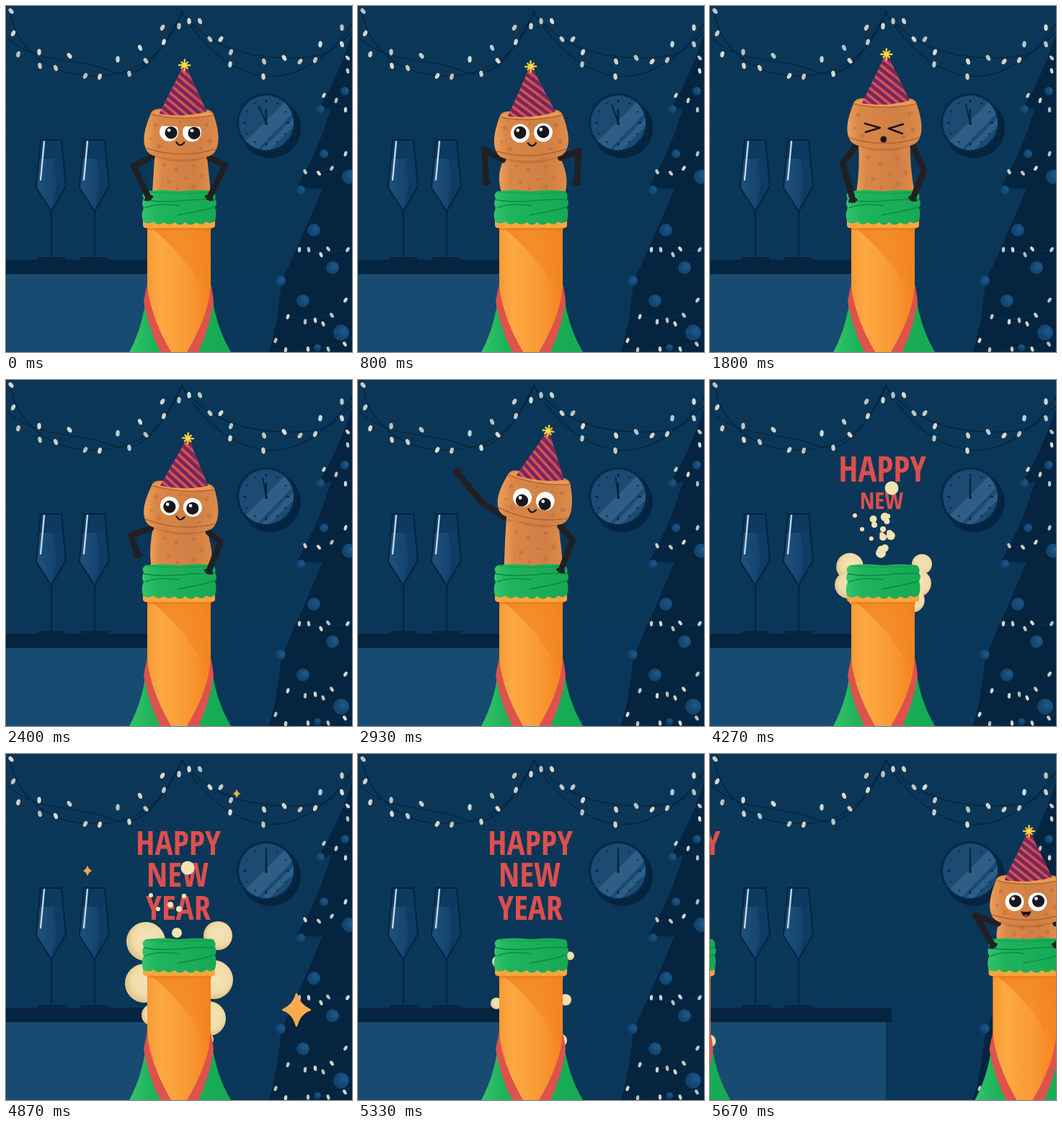
Recreate the animation shown at these times as an HTML page. Size 480 by 480 pixels, loop 5740 ms.

```html
<!DOCTYPE html>
<html lang="en">
<head>
<meta charset="utf-8">
<title>Happy New Year</title>
<style>
html, body { margin: 0; width: 100%; height: 100%; overflow: hidden; background: #0b3658; }
svg { display: block; width: 100vw; height: 100vh; }
.msg { font-weight: 700; font-stretch: 62.5%; fill: #dc4f4d; text-anchor: middle; }
.line { fill: none; stroke-linecap: round; stroke-linejoin: round; }
</style>
</head>
<body>
<svg id="stage" viewBox="0 0 480 480">
  <defs>
    <linearGradient id="wall" x2="0" y2="1"><stop stop-color="#0b3658"/><stop offset="1" stop-color="#0a3759"/></linearGradient>
    <linearGradient id="glass"><stop stop-color="#1c527f"/><stop offset=".5" stop-color="#164672"/><stop offset="1" stop-color="#0e3b63"/></linearGradient>
    <linearGradient id="cork"><stop stop-color="#eda057"/><stop offset=".16" stop-color="#d98748"/><stop offset=".7" stop-color="#d07f45"/><stop offset="1" stop-color="#dd8c49"/></linearGradient>
    <linearGradient id="foil"><stop stop-color="#f99a35"/><stop offset=".2" stop-color="#fda941"/><stop offset=".6" stop-color="#f99b37"/><stop offset="1" stop-color="#f5851f"/></linearGradient>
    <linearGradient id="green"><stop stop-color="#35c56b"/><stop offset=".2" stop-color="#1fb45c"/><stop offset="1" stop-color="#16a953"/></linearGradient>
    <linearGradient id="fade" x1="0" y1="0" x2="1" y2="1"><stop stop-color="#ee7e1d" stop-opacity=".75"/><stop offset="1" stop-color="#ee7e1d" stop-opacity=".15"/></linearGradient>
    <radialGradient id="foam" cx=".55" cy=".45"><stop stop-color="#f4e3b6"/><stop offset=".75" stop-color="#f0dcaa"/><stop offset="1" stop-color="#e3c98f"/></radialGradient>
    <radialGradient id="ball" cx=".65" cy=".4"><stop stop-color="#1d5a8b"/><stop offset="1" stop-color="#124470"/></radialGradient>
    <clipPath id="faceClip"><circle cx="361" cy="162" r="38"/></clipPath>
    <clipPath id="hatClip"><path d="M-33 2L-2-62Q1-67 4-62L33-2Q2 7-33 2Z"/></clipPath>

    <g id="hat">
      <g clip-path="url(#hatClip)">
        <rect x="-40" y="-70" width="80" height="80" fill="#db524f"/>
        <path id="stripes" class="line" stroke="#74285f" stroke-width="5"/>
        <path d="M33-2L4-62 0-66 20 6Z" fill="#74285f" opacity=".16"/>
      </g>
      <path id="star" class="line" stroke="#ffce35" stroke-width="2.4"/>
      <circle cx="1" cy="-66" r="3.2" fill="#ffd84a"/>
    </g>

    <g id="head">
      <path d="M-43-27Q-41-35-30-35Q0-31 32-35Q43-35 45-27Q56 5 49 20Q46 29 34 31Q0 38-34 31Q-46 29-49 20Q-56 5-43-27Z" fill="url(#cork)"/>
      <path d="M-41-27Q-39-33-30-33Q0-30 32-33Q41-33 43-27Q0-18-41-27Z" fill="#e89a55"/>
      <g class="line" stroke="#a95a2b" stroke-width="1.6" opacity=".75"><path d="M-41-27Q0-18 43-27"/><path d="M-48 20Q0 35 48 20"/></g>
      <g fill="#b5683a" opacity=".45"><circle cx="-36" cy="-12" r="3"/><circle cx="-41" cy="7" r="2"/><circle cx="-30" cy="17" r="3.2"/><circle cx="35" cy="-14" r="3"/><circle cx="40" cy="9" r="3.4"/><circle cx="27" cy="19" r="2.4"/><circle cx="-1" cy="-17" r="2"/></g>
    </g>

    <g id="bottle">
      <path d="M196 385Q193 440 171 480H312Q288 440 284 385Z" fill="url(#green)"/>
      <path d="M196 300H284V386Q287 398 288 410Q283 446 267 480H214Q197 446 191 410Q193 398 196 386Z" fill="#dd524d"/>
      <path d="M196 300H284V386Q282 428 251 480H229Q199 428 196 386Z" fill="url(#foil)"/>
      <path d="M202 308H284V386Q282 400 276 414Q270 365 202 308Z" fill="url(#fade)"/>
      <path d="M190 296H290V304Q290 308 285 308H195Q190 308 190 304Z" fill="#fba53e"/>
      <path d="M195 308H285V311H197Z" fill="#e77817" opacity=".55"/>
      <path d="M194 257Q215 254 240 257Q266 254 287 257Q292 261 290 268Q294 273 290 279Q293 288 290 298Q284 304 278 299Q271 306 264 300Q256 307 249 300Q241 307 234 300Q226 306 219 300Q211 306 205 299Q197 304 190 299Q187 288 191 280Q187 274 191 267Q187 261 194 257Z" fill="url(#green)"/>
      <g class="line" stroke="#0b8b47" stroke-width="1.6"><path d="M192 269Q215 273 246 270T289 269"/><path d="M193 280Q210 273 240 277"/><path d="M238 290Q268 285 289 279"/></g>
      <path d="M196 258Q240 262 286 258" class="line" stroke="#0b8b47" stroke-width="1" opacity=".6"/>
    </g>
  </defs>
  <g id="room"></g>
  <g id="bulbs"></g>
  <g id="hands"></g>
  <g id="sparks"></g>
  <g id="front"></g>
</svg>
<script>
const $ = id => document.getElementById(id);
const STEP = 1000 / 15, COUNT = 86, LOOP = 5740;
const POP = 61, LEAVE = 81;
const INK = '#04243f', BLACK = '#202024';
const clamp = v => Math.max(0, Math.min(1, v));
const circle = (x, y, r, fill) => `<circle cx="${x}" cy="${y}" r="${r}" fill="${fill}"/>`;
const line = (d, color, w) => `<path class="line" d="${d}" stroke="${color}" stroke-width="${w}"/>`;
const group = (transform, inner) => `<g transform="${transform}">${inner}</g>`;
const range = n => [...Array(n).keys()];

// ---------- room ----------
const wineGlass = x => group(`translate(${x} 0)`,
  `<path d="M48 186H77L83 250 63 285 42 252Z" fill="#0d3a61"/>
   <path d="M47 212H79L83 250 63 285 42 252Z" fill="url(#glass)"/>
   <path d="M66 212H79L83 250 63 285 70 250Z" fill="#0d3c65"/>` +
  line('M48 186H77L83 250 63 285 42 252ZM63 285V349', INK, 2) +
  line('M45 350H81', INK, 3) + line('M53 188L48 241', '#c8d5df', 2.4));

const balls = [[470,118,6],[436,143,6],[441,205,6],[476,237,10],[409,255,6],[427,311,9],
  [453,363,9],[381,381,7],[412,409,9],[465,453,11],[432,474,5]];

const clock = () => {
  const ticks = range(12).map(i =>
    `<path d="M361 130V${i % 3 ? 132 : 134}" transform="rotate(${i * 30} 361 162)" stroke="${INK}" stroke-width="2"/>`).join('');
  return circle(367, 169, 42, INK) + circle(361, 162, 41, '#05294a') + circle(361, 162, 38, '#1b4a72') +
    `<g clip-path="url(#faceClip)"><path d="M325 195L392 128 404 142 345 203Z" fill="#2e5d85"/>
     <path d="M349 205L407 147 412 153 356 210Z" fill="#2e5d85"/></g>` + ticks;
};

$('room').innerHTML = `<rect width="480" height="480" fill="url(#wall)"/>
  <rect y="370" width="244" height="110" fill="#184b72"/><rect y="352" width="252" height="20" fill="${INK}"/>` +
  wineGlass(0) + wineGlass(60) +
  `<path d="M480 40Q462 95 432 146Q443 145 451 140Q434 200 404 250Q424 254 439 253Q412 318 382 384Q377 440 365 480H480Z" fill="${INK}"/>` +
  balls.map(([x, y, r]) => circle(x, y, r, 'url(#ball)')).join('') +
  line('M438 122Q457 138 480 140M412 230Q452 236 480 198M400 336Q440 350 480 334M386 428Q440 450 480 402M370 476Q430 484 480 462', '#0b3355', 1) +
  clock() +
  line('M5 0C10 55 55 98 125 97S225 55 244 9', INK, 1.2) +
  line('M0 42C40 82 95 70 145 90S222 48 244 9', INK, 1.2) +
  line('M244 9C275 60 315 92 358 97S450 72 480 24', INK, 1.2) +
  line('M244 9C270 42 310 70 385 72S455 55 480 36', INK, 1.2) + circle(244, 9, 2, INK);

const cord = [[7,7],[10,38],[17,67],[46,64],[47,83],[69,86],[88,69],[110,97],[130,98],[155,74],
  [171,94],[186,58],[194,76],[217,30],[219,50],[240,28],[254,21],[269,21],[283,46],[298,46],[312,64],
  [311,81],[357,98],[358,77],[386,72],[408,77],[429,75],[436,53],[466,30],[466,53]];
const treeLights = [[474,72],[441,124],[458,131],[471,144],[474,90],[415,230],[434,232],[452,225],
  [471,205],[407,338],[420,338],[437,345],[447,337],[474,338],[391,431],[415,438],[429,436],
  [440,441],[452,429],[471,408],[374,464],[388,477],[419,476],[447,476],[470,469]];

const bulb = (n, rx, ry) => ([x, y], i) => {
  const glow = .92 + .08 * Math.sin(2 * Math.PI * n * 5 / COUNT + i * 2.4);
  return `<ellipse cx="${x}" cy="${y}" rx="${rx}" ry="${ry}" fill="#dcdcd2" opacity="${glow}" transform="rotate(${(i * 67) % 80 - 40} ${x} ${y})"/>`;
};

// ---------- hat details ----------
$('stripes').setAttribute('d', range(10).map(i => `M-60 ${i * 11 - 110}L60 ${i * 11 - 14}`).join(''));
$('star').setAttribute('d', range(8).map(i => {
  const a = i * Math.PI / 4, r = i % 2 ? 6 : 7.5;
  return `M1-66l${(r * Math.cos(a)).toFixed(2)} ${(r * Math.sin(a)).toFixed(2)}`;
}).join(''));

// ---------- motion tracks, first value is the step ----------
// x, y, tilt, bulge
const body = [[0,243,178,1,0],[4,243,175,1,-2],[8,242,179,0,3],[12,240,180,-2,12],[16,240,182,-2,13],
  [20,242,176,0,4],[24,241,165,0,-3],[27,241,163,0,-4],[31,241,161,0,-4],[34,242,180,2,8],
  [39,245,170,7,2],[44,246,165,9,1],[50,247,167,9,3],[53,246,160,8,4],[56,246,152,6,8],
  [58,246,150,5,8],[60,245,166,0,14],[61,243,110,0,0],[62,243,-10,0,0],[63,243,-200,0,0],[81,243,203,0,5]];
// face x, y, gaze x, y, lid, shut, mouth
const face = [[0,-1,-3,3,1,-8,0,0],[8,-1,-3,3,1,-8,0,0],[11,1,-4,0,-1,-13,0,0],[19,1,-2,0,0,-13,0,0],
  [21,-1,4,0,0,-13,1,1],[27,-1,6,0,0,-13,1,1],[32,-1,2,0,0,-13,0,0],[34,0,-1,0,1,-13,0,0],
  [44,-2,1,0,4,-13,0,0],[53,-1,0,0,2,-13,0,0],[54,0,0,1,-2,-13,0,1],[60,0,0,1,-2,-13,0,1],[81,-1,2,1,-1,-12.5,0,2]];
// elbow x, y, hand x, y
const leftArm = [[0,177,222,196,262],[9,177,220,196,262],[12,175,199,178,241],[16,175,203,178,243],
  [20,180,218,197,264],[27,184,218,197,265],[34,178,222,197,264],[37,172,213,176,230],[40,168,180,150,150],
  [44,170,168,140,131],[47,170,161,163,124],[50,170,167,140,131],[53,170,162,160,124],[56,170,160,165,127],
  [60,172,180,160,140],[61,180,160,170,200],[62,185,40,175,80],[81,172,224,194,262]];
const rightArm = [[0,304,221,284,262],[9,304,220,284,262],[12,306,201,304,241],[16,306,204,304,243],
  [20,302,222,283,263],[27,297,228,283,263],[44,298,222,283,260],[56,294,232,283,260],
  [60,300,225,284,260],[61,306,160,312,200],[62,303,40,308,80],[81,309,224,286,262]];

function at(track, n) {
  let i = track.length - 1;
  while (track[i][0] > n) i--;
  const a = track[i], b = track[i + 1] || a;
  const u = b === a ? 0 : (n - a[0]) / (b[0] - a[0]), e = u * u * (3 - 2 * u);
  return a.slice(1).map((v, k) => v + (b[k + 1] - v) * e);
}

// ---------- character ----------
function pose(n) {
  let [x, y, r, bulge] = at(body, n);
  if (n > 21 && n < 32) x += n % 2 ? .8 : -.8;
  const c = Math.cos(r * Math.PI / 180), s = Math.sin(r * Math.PI / 180);
  return { x, y, r, bulge, to: (px, py) => [x + px * c - py * s, y + px * s + py * c] };
}

function neck({ y, bulge, to }) {
  const foot = Math.min(259, y + 110), out = Math.max(0, bulge) * .3;
  const [lx, ly] = to(-36, 26), [rx, ry] = to(36, 26);
  const bl = 203 - out, br = 284 + out;
  const shape = `M${lx} ${ly}Q${(lx + bl) / 2 - bulge} ${(ly + foot) / 2} ${bl} ${foot}Q244 ${foot + 5} ${br} ${foot}` +
    `Q${(rx + br) / 2 + bulge} ${(ry + foot) / 2} ${rx} ${ry}Z`;
  const mid = (ly + ry) / 2, h = foot - mid;
  const spots = [[-24,.3,2.4],[-8,.42,3.2],[16,.32,2.6],[27,.6,3.4],[6,.64,2.2],[-18,.72,3],[17,.84,3],[-6,.9,2.4]];
  return `<path d="${shape}" fill="url(#cork)"/><g opacity=".45">` +
    spots.map(([dx, v, r]) => circle(244 + dx, mid + h * v, r, '#b5683a')).join('') + '</g>' +
    `<path d="M${lx} ${ly + 6}Q${(lx + rx) / 2} ${mid + 19} ${rx} ${ry + 6}V${ry}H${lx}Z" fill="#9d5227" opacity=".3"/>`;
}

function arm([sx, sy], [ex, ey, hx, hy]) {
  const a = Math.atan2(hy - ey, hx - ex);
  const fingers = [-.75, -.25, .25, .75].map(d =>
    `M${hx} ${hy}l${7 * Math.cos(a + d)} ${7 * Math.sin(a + d)}`).join('');
  return line(`M${sx} ${sy}L${ex} ${ey}L${hx} ${hy}`, BLACK, 8.5) + line(fingers, BLACK, 3.6);
}

function eye(x, gx, gy, lid) {
  const w = Math.sqrt(Math.max(0, 169 - lid * lid)) || .01;
  return group(`translate(${x} 0)`, `<path d="M${-w} ${lid}A13 13 0 1 0 ${w} ${lid}Z" fill="#fff"/>` +
    circle(gx, gy, 8.6, '#17171b') + circle(gx - 3, gy - 3.4, 2.4, '#fff'));
}

const mouths = [
  line('M-5.5-2Q0 6 5.5-2', '#1b1518', 2.2),
  '<ellipse rx="4.4" ry="4.6" fill="#1b1518"/>',
  '<path d="M-7-3Q0-1 7-3Q5 5 0 5Q-5 5-7-3Z" fill="#1b1518"/><path d="M-3 3Q0 1 3 3Q0 5-3 3Z" fill="#db524f"/>'
];

function head(p, n) {
  const [fx, fy, gx, gy, lid] = at(face, n);
  const [shut, mouth] = face.filter(k => k[0] <= n).pop().slice(6);
  const eyes = shut
    ? line('M-26-6L-5 0-25 6M27-5L7 1 26 8', '#1b1518', 2.6)
    : eye(-16, gx, gy, lid) + eye(16, gx, gy, lid);
  const hatTilt = n > 53 && n < 60 ? 4 : 0;
  return group(`translate(${p.x} ${p.y}) rotate(${p.r})`,
    `<use href="#head"/>` + group(`translate(2 -30) rotate(${hatTilt})`, '<use href="#hat"/>') +
    group(`translate(${fx} ${fy})`, eyes + group('translate(0 16)', mouths[mouth])));
}

// ---------- celebration ----------
const blobs = [[194,260,27],[192,318,27],[203,362,15],[294,252,20],[288,313,27],[281,367,24],[279,396,9]];
function foam(n) {
  if (n < POP) return '';
  const u = clamp((n - POP) / 12), k = 1 - (1 - u) ** 2, after = Math.max(0, n - 73);
  return blobs.map(([x, y, r], i) => {
    const last = i === blobs.length - 1;
    const size = r * Math.min(1, k * 1.6) * (last ? 1 : clamp(1 - after / 10));
    const cx = x + (last ? after * .3 : 0);
    return circle(cx, 258 + (y - 258) * k + after * (last ? .2 : 4), size, 'url(#foam)');
  }).join('');
}

const drops = [[252,158,9.5],[237,248,7],[228,209,4],[240,215,4],[211,215,3],[201,196,3],[247,197,3.2]];
function bubbles(n) {
  if (n < POP || n > 82) return '';
  const d = n - 73, out = [];
  if (n > 63) for (const [x, y, r] of drops) out.push([x, y + 9 * d + .9 * d * d, r]);
  if (n < 72) for (const i of range(12)) {
    const k = n - POP - i % 3;
    if (k >= 0) out.push([240 + k * ((i * 37) % 13 - 6) * .9, 250 - k * (16 + (i * 29) % 11) + 2 * k * k, 3 + i % 4]);
  }
  return out.filter(o => o[1] < 256).map(([x, y, r]) => circle(x, y, r, '#f3e2b3')).join('');
}

const words = [['HAPPY', 239, 140], ['NEW', 238, 184], ['YEAR', 239, 230]];
function message(n) {
  return words.map(([word, x, y], i) => {
    const u = clamp((n - POP - 1 - i) / 5), v = u - 1;
    const s = 1 + 2.7 * v ** 3 + 1.7 * v * v;
    return u ? group(`translate(${x} ${y - 18}) scale(${s})`, `<text class="msg" y="18">${word}</text>`) : '';
  }).join('');
}

const twinkles = [[403,355,22,66,80],[113,162,6.5,68,78],[320,55,5.5,68,78]];
const sparks = n => twinkles.map(([x, y, size, from, to]) => {
  const s = size * Math.sin(Math.PI * clamp((n - from) / (to - from)));
  return s > .1 ? group(`translate(${x} ${y}) scale(${s})`,
    '<path d="M0-1Q.16-.32.85 0Q.2.22 0 1Q-.2.22-.85 0Q-.16-.32 0-1Z" fill="#fbab4e" stroke="#fbab4e" stroke-width=".12" stroke-linejoin="round"/>') : '';
}).join('');

function bottle(n, dx, hasCork) {
  const p = pose(n);
  const parts = hasCork
    ? neck(p) + '<use href="#bottle"/>' + arm(p.to(-40, 32), at(leftArm, n)) + arm(p.to(40, 32), at(rightArm, n)) + head(p, n)
    : '<use href="#bottle"/>';
  const party = hasCork && n < POP || n >= LEAVE && hasCork ? ['', ''] : [foam(n), message(n) + bubbles(n)];
  return group(`translate(${dx} 0)`, party[0] + parts + party[1]);
}

// ---------- lettering: narrowest installed face ----------
function pickFont() {
  const t = document.createElementNS('http://www.w3.org/2000/svg', 'text');
  t.setAttribute('class', 'msg');
  t.textContent = words[0][0];
  $('stage').append(t);
  let best = { w: Infinity };
  for (const name of ['Noto Sans', 'Open Sans Condensed', 'Open Sans', 'Roboto Condensed', 'Roboto', 'Lato']) {
    t.style.font = `700 51px "${name}", sans-serif`;
    t.style.fontStretch = '62.5%';
    const w = t.getComputedTextLength();
    if (w < best.w) best = { w, name };
  }
  t.remove();
  const css = document.createElement('style');
  css.textContent = `.msg { font-family: "${best.name}", sans-serif; font-size: ${51 * Math.min(1, 118 / best.w)}px; }`;
  document.head.append(css);
}

function draw(n) {
  $('bulbs').innerHTML = cord.map(bulb(n, 2.7, 4.4)).join('') + treeLights.map(bulb(n, 2.2, 3.8)).join('');
  $('hands').innerHTML =
    `<path d="M361 163V143" stroke="${INK}" stroke-width="2.4" transform="rotate(${-2 * clamp(1 - n / 63)} 361 162)"/>` +
    `<path d="M361 164V135" stroke="${INK}" stroke-width="1.8" transform="rotate(${-24 * clamp(1 - n / 63)} 361 162)"/>` + circle(361, 163, 2, INK);
  $('sparks').innerHTML = sparks(n);
  const slide = 480 * clamp((n - LEAVE) / 5) ** 2.36;
  $('front').innerHTML = bottle(n, -slide, n < 63) + (n > LEAVE ? bottle(n, 480 - slide, true) : '');
}

pickFont();
const start = performance.now();
let shown = -1;
function tick() {
  const t = (performance.now() - start) % LOOP;
  const n = Math.min(COUNT - 1, Math.floor((t + 3.4) / STEP));
  if (n !== shown) draw(shown = n);
  requestAnimationFrame(tick);
}
tick();
</script>
</body>
</html>
```
